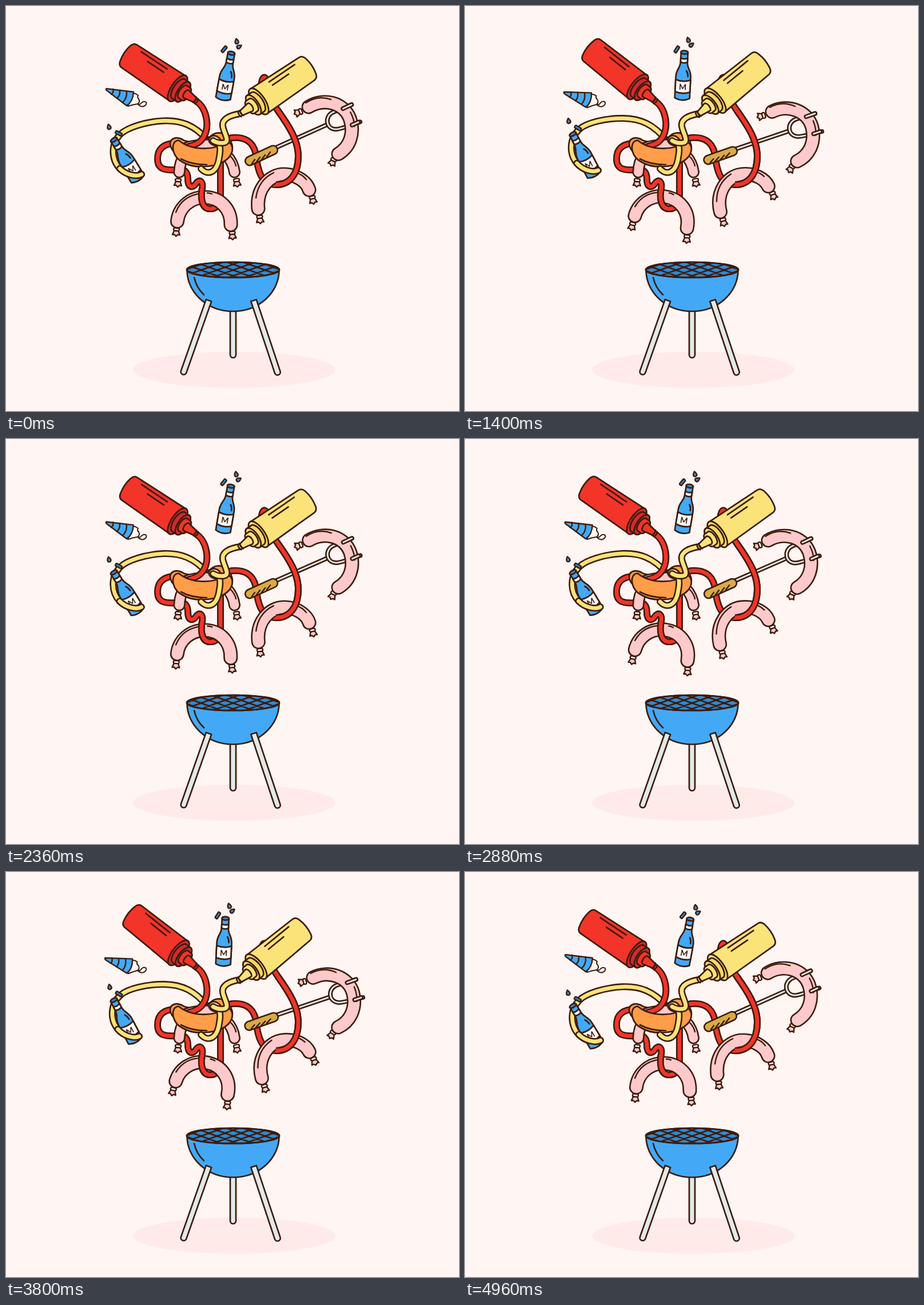
An HTML page for the animation above (5 s loop, 792 by 707 pixels).

```html
<!DOCTYPE html>
<html lang="en">
<head>
<meta charset="utf-8">
<title>Barbecue</title>
<style>
html, body { margin: 0; width: 100%; height: 100%; overflow: hidden; background: #fff5f2; }
svg { display: block; width: 792px; height: 707px; }
text { font: bold 14px Lato, sans-serif; fill: #3c1b0c; stroke: none; text-anchor: middle; }
</style>
</head>
<body>
<svg id="stage" viewBox="0 0 792 707" fill="none" stroke="#3c1b0c" stroke-width="2.7" stroke-linecap="round" stroke-linejoin="round"></svg>
<script>
const RED = '#f23429', DARK_RED = '#d02a30', YELLOW = '#fbe37a', DARK_YELLOW = '#f3d965';
const BLUE = '#43a9f6', DEEP = '#3289cf', PINK = '#fec9ca', ORANGE = '#ff9d48', GREY = '#e2e9e7', WHITE = '#fff8f5';

// --- drawing helpers ---
const shape = (d, fill = 'none', extra = '') => `<path d="${d}" fill="${fill}" ${extra}/>`;
const at = (x, y, deg, body, extra = '') => `<g transform="translate(${x} ${y}) rotate(${deg}) ${extra}">${body}</g>`;
const tube = (d, color, w = 12, cap = 'round') =>
  shape(d, 'none', `stroke-width="${w}" stroke-linecap="${cap}"`) +
  shape(d, 'none', `stroke="${color}" stroke-width="${w - 5.2}" stroke-linecap="${cap}"`);
const over = (d, color) => tube(d, color, 12, 'butt');
const swing = (kind, deg, x, y, body) =>
  `<g data-kind="${kind}" data-deg="${deg}" data-pivot="${x} ${y}">${body}</g>`;

const tail = (x, y, deg) => at(x, y, deg,
  shape('M-3.5 2L-6.500 9.500L-3 9L0 12L3 9L6.500 9.500L3.500 2Z', PINK, 'stroke-width="2.4"') +
  '<rect x="-5" y="-2.5" width="10" height="5" rx="2.3" fill="#fff8f5" stroke-width="2.4"/>');
const sausage = (d, ends, shine = '', w = 25) =>
  ends.map(e => tail(...e)).join('') + tube(d, PINK, w) + shape(shine, 'none', 'stroke-width="2.4"');

const squeezer = (x, y, deg, color, dark, flip) => at(x, y, deg,
  shape('M-42 -26L-143 -24Q-150 -24 -152 -16Q-156 0 -152 16Q-150 24 -143 24L-42 26Z', color) +
  `<ellipse cx="-42" rx="11" ry="26.500" fill="${dark}"/>` +
  shape('M-40 -20H-31A9 20 0 0 1 -31 20H-40A9 20 0 0 1 -40 -20Z', dark) +
  `<ellipse cx="-31" rx="9" ry="20" fill="${dark}"/>` +
  shape('M-31 -13H-24A6 13 0 0 1 -24 13H-31A6 13 0 0 1 -31 -13Z', color) +
  shape('M-24 -8L-5 -4.5V4.5L-24 8A4 8 0 0 1 -24 -8Z', color) +
  shape('M-6 -5.5Q-3 0 -6 5.5M-2 -5Q1 0 -2 5') +
  shape('M-130 -18H-76M-112 -10H-78'), `scale(1 ${flip})`);

const bottle = (x, y, deg) => at(x, y, deg,
  shape('M-13 -3V-40C-13 -53 -6 -55 -6 -66V-83H6V-66C6 -55 13 -53 13 -40V-3Q0 4 -13 -3Z', BLUE) +
  shape('M-13 -14V-35Q0 -30 13 -35V-14Q0 -9 -13 -14Z', WHITE) +
  shape('M-6 -66V-73Q0 -70 6 -73V-66Q0 -63 -6 -66Z', WHITE) +
  '<ellipse cy="-83" rx="6.3" ry="3" fill="#3289cf"/>' +
  shape('M8 -41Q8 -47 5 -51') +
  '<text y="-17.5">M</text>');
const cap = (x, y, deg) => at(x, y, deg, `<rect x="-6" y="-2.4" width="12" height="4.8" rx="1.4" fill="${DEEP}" stroke-width="2.4"/>`);
const drop = (x, y, deg) => at(x, y, deg, shape('M0 -4.5Q4.5 1 2.5 3.5Q0 5.5 -2.5 3.5Q-4.5 1 0 -4.5Z', '#4d87ad', 'stroke-width="2.4"'));

const leg = (x, y, deg, len) => at(x, y, deg, shape(`M-5 0H5V${len}a5 5 0 0 1 -10 0Z`, GREY));

// --- grill ---
function grill() {
  let bars = '';
  for (let x = 285; x < 520; x += 28) bars += `M${x - 50} 479L${x + 50} 443M${x - 50} 443L${x + 50} 479`;
  return '<ellipse cx="399" cy="635" rx="177" ry="31.5" fill="#ffeaea" stroke="none"/>' +
    leg(397, 525, 0, 84) +
    shape('M316.500 461A80.500 72 0 0 0 477.500 461Z', BLUE) +
    '<clipPath id="grate"><ellipse cx="397" cy="460.500" rx="81" ry="13.500"/></clipPath>' +
    `<ellipse cx="397" cy="460.500" rx="81" ry="13.500" fill="${DEEP}"/>` +
    shape(bars, 'none', 'clip-path="url(#grate)"') +
    '<ellipse cx="397" cy="460.500" rx="81" ry="13.500"/>' +
    shape('M329 474Q333 492 346 504') +
    leg(354.500, 514, 19.4, 132) + leg(433, 514, -18.4, 132);
}

// --- ropes of sauce ---
const redFall = 'C495 210 511 235 511 262C511 295 495 312 472 312';
const redRight = 'M446 150C445 118 457 118 456 140C456 155 466 168 475 182' + redFall +
  'C445 312 440 285 437 260C433 235 415 228 395 230C385 232 380 240 375 250';
const redDip = 'C340 335 342 352 355 354';
const redLeft = 'M306 240C275 237 265 250 265 267C265 285 278 287 296 286C312 282 318 290 318 302' +
  'C318 318 327 318 332 310C338 301 345 306 343 318' + redDip + 'C368 355 375 346 375 330V262';
const arcEnd = 'C210 295 228 299 237 294';
const arc = 'M352 234C330 208 305 199 275 200.500C245 202 212 212 200 224C183 241 184 268 199 284';

const fork = () =>
  tube('M470 248L561 207', GREY, 8) +
  tube('M604 172L572 185C556 192 559 215 577 215Q584 215 619 202', GREY, 8) +
  tube('M426 270.500L467 251.500', '#d9ab47', 18) +
  shape('M430 275L435 268M438 272L444 264M447 268L453 260M456 263L462 255', 'none', 'stroke-width="2.4"') +
  sausage('M529 176C555 160 590 168 601 196C610 222 601 246 581 258',
    [[515, 184, 68], [573, 268, 25]], 'M524 169Q545 155 568 163M602 185Q609 198 609 210') +
  tube('M589 179L604 172', GREY, 8) + tube('M605 207.500L616 202.500', GREY, 8);

const cone = () =>
  shape('M219 154Q224 150 231 156Q229 160 232 162Q235 168 230 171Q222 172 213 175Z', WHITE, 'stroke-width="2"') +
  shape('M230 171Q236 177 241 175Q247 172 245 168Q241 165 237 169Q234 173 230 171', WHITE, 'stroke-width="2"') +
  shape('M175.500 144Q174 146 177 148L211 174Q222 167 223 150Z', BLUE, 'stroke-width="2.4"') +
  shape('M187 145Q189 151 184 154M199 147Q200 156 194 161M211 149Q212 161 204 168', 'none', 'stroke-width="2.4"');

const hotdogBack = () =>
  shape('M290 250C280 233 297 224 312 235C332 241 350 234 362 224C378 215 396 232 396 248L380 262H300Z', ORANGE) +
  shape('M310 240C328 232 370 230 380 240L350 256Z', PINK);
const hotdogFront = () =>
  shape('M299 235C288 238 289 262 308 272C330 286 374 282 390 264C400 252 396 235 384 238C364 253 324 252 304 236Q302 234 299 235Z', ORANGE) +
  shape('M306 267Q324 277 351 277');

document.getElementById('stage').innerHTML =
  grill() +
  tube(redRight, RED) +
  tube(redLeft, RED) +
  swing('dangle', 13, 355, 356,
    sausage('M299.500 376C302 352 322 334 347 334C375 334 394 355 393 382',
      [[298, 390, 4], [395.500, 396, -4]], 'M297 360Q308 331 342 327M352 326.500Q356 326.500 360 328')) +
  over('M343 318' + redDip, RED) +
  sausage('M303 290C304 262 320 245 350 245C380 245 397 270 399.500 290', [[301, 304, 4], [403, 304, -8]], 'M393 263Q400 270 402 279', 21) +
  swing('dangle', -10.5, 484, 316,
    sausage('M441 354C437 318 462 294 485 294C510 294 526 308 530 321',
      [[443.500, 368, -6], [535.500, 334, -12]], 'M437 335Q441 304 468 291M507 291Q518 294 525 303')) +
  swing('sway', 5.6, 447, 262, fork()) +
  over('M475 182' + redFall, RED) +
  swing('sway', 3.7, 345, 225,
    tube(arc + arcEnd, YELLOW) + bottle(232, 304.500, -31.5) + tube('M199 284' + arcEnd, YELLOW) +
    cap(197, 222.500, 28) + drop(180, 211, -15)) +
  hotdogBack() +
  tube('M331 165C352 178 356 210 346 228C340 238 334 241 320 245', RED) +
  hotdogFront() +
  tube('M378 239C360 242 355 232 363 231C374 232 376 248 373 263C369 293 352 296 341 284', YELLOW) +
  tube('M409 188C390 191 377 198 379 210C381 222 393 238 380 239Q370 240 362 235', YELLOW) +
  swing('sway', 5, 332, 165, squeezer(335, 167, 33.5, RED, DARK_RED, 1)) +
  swing('sway', -5.2, 425, 215, squeezer(407, 190, 146, YELLOW, DARK_YELLOW, -1)) +
  swing('sway', -7.6, 378, 160,
    bottle(379, 164, 10.5) + cap(381.500, 75.500, -50) + drop(403.500, 61.500, -10) + drop(408, 71, 60)) +
  swing('sway', -5.3, 240, 172, cone());

// --- motion ---
const LOOP = 5000;
const dangleKeys = [[0, 0], [990, 1], [2210, 0], [3365, 1], [LOOP, 0]];
const ease = u => u * u * (3 - 2 * u);
const motion = {
  sway: t => (1 - Math.cos((t - 100) / 2500 * 2 * Math.PI)) / 2,
  dangle(t) {
    const i = dangleKeys.findIndex(k => k[0] > t);
    const [t0, a] = dangleKeys[i - 1], [t1, b] = dangleKeys[i];
    return a + (b - a) * ease((t - t0) / (t1 - t0));
  }
};
const parts = [...document.querySelectorAll('[data-kind]')];
const start = performance.now();

function draw(now) {
  const t = Math.max(0, now - start) % LOOP;
  for (const el of parts) {
    const { kind, deg, pivot } = el.dataset;
    el.setAttribute('transform', `rotate(${deg * motion[kind](t)} ${pivot})`);
  }
  requestAnimationFrame(draw);
}
draw(start);
</script>
</body>
</html>
```
